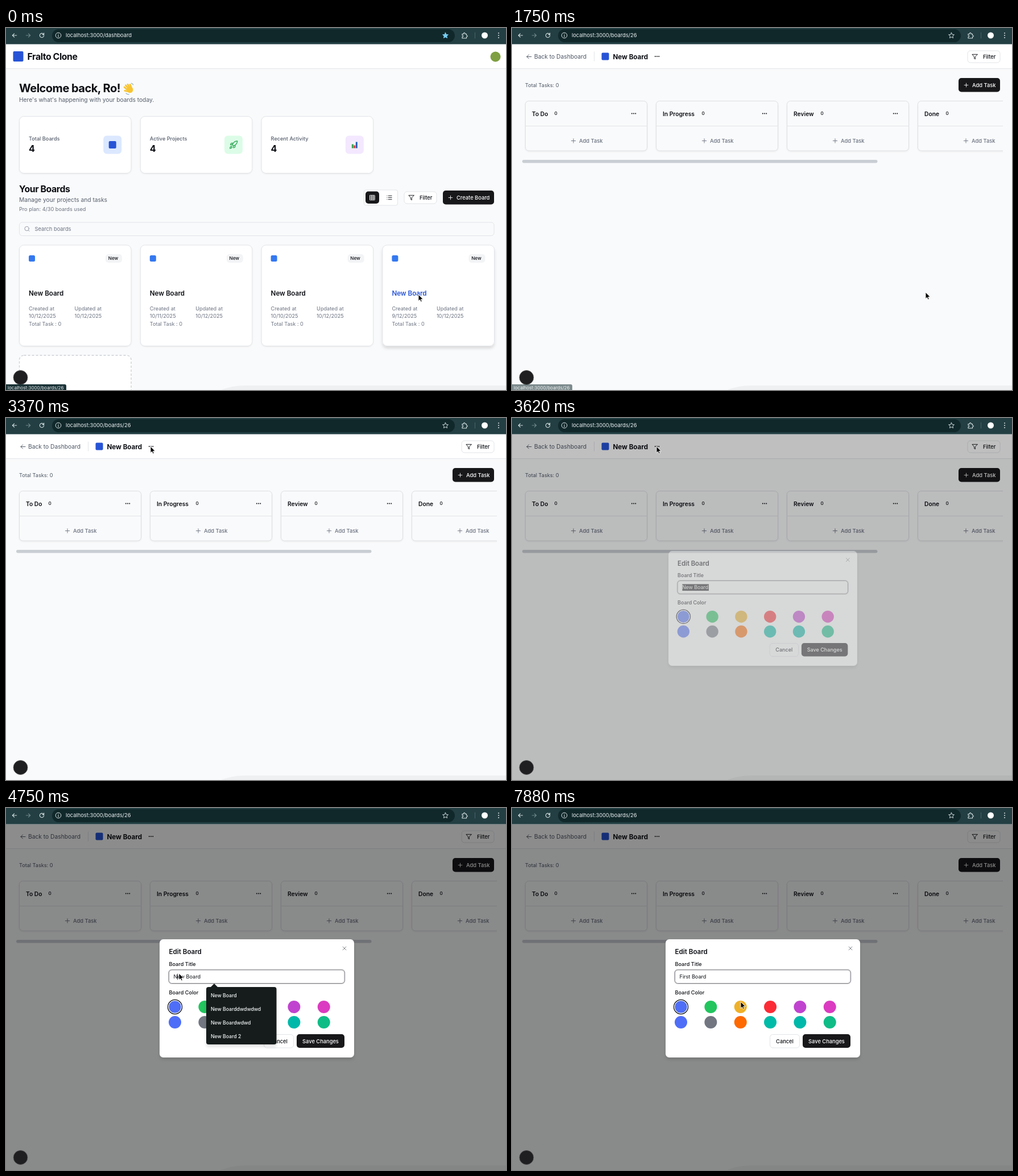
Animation, 879 px wide and 637 px high, one loop 8 s. Source, as an HTML page:

```html
<!DOCTYPE html>
<html lang="en">
<head>
<meta charset="utf-8">
<title>Board dashboard</title>
<style>
html, body { margin: 0; width: 100%; height: 100%; overflow: hidden; background: #f9fafb; }
svg { display: block; width: 879px; height: 637px; font-family: Inter, sans-serif; }
text { white-space: pre; }
</style>
</head>
<body>
<svg id="stage" viewBox="0 0 879 637"></svg>
<script>
const INK = '#0d0f14', GRAY = '#6b7280', LINE = '#e2e4e8', BLUE = '#2754d6';
const SMALL = 9.15, BODY = 10.25, LARGE = 11.6;
const LOOP = 8000, TICK = 125;
const COLUMNS = [23.5, 236.3, 449.1, 661.9];

// Drawing helpers: text is placed by its vertical centre.
const text = (x, y, str, size = SMALL, weight = 400, fill = INK, extra = '') =>
  `<text x="${x}" y="${y + size * .36}" font-size="${size}" font-weight="${weight}" fill="${fill}" ${extra}>${str}</text>`;
const rect = (x, y, w, h, r = 0, fill = '#fff', extra = '') =>
  `<rect x="${x}" y="${y}" width="${w}" height="${h}" rx="${r}" fill="${fill}" ${extra}/>`;
const box = (x, y, w, h, r, fill = '#fff', stroke = LINE, extra = '') =>
  rect(x, y, w, h, r, fill, `stroke="${stroke}" ${extra}`);
const circle = (x, y, r, fill, extra = '') => `<circle cx="${x}" cy="${y}" r="${r}" fill="${fill}" ${extra}/>`;
const path = (d, stroke, width = 1, fill = 'none') =>
  `<path d="${d}" stroke="${stroke}" stroke-width="${width}" fill="${fill}" stroke-linecap="round" stroke-linejoin="round"/>`;
const group = (content, attrs) => `<g ${attrs}>${content}</g>`;
// Icons live on a 24-unit grid, centred on (x, y).
const icon = (x, y, size, d, color, width = 2, fill = 'none') =>
  group(path(d, color, width, fill), `transform="translate(${x - size / 2} ${y - size / 2}) scale(${size / 24})"`);
const dots = (x, y, color, dx = 3.2, dy = 0) =>
  [-1, 0, 1].map(i => circle(x + i * dx, y + i * dy, 1, color)).join('');
const logo = (x, y, size) => rect(x - size / 2, y - size / 2, size, size, 2, BLUE);

const ICONS = {
  back: 'M20 12H4M11 5l-7 7 7 7',
  forward: 'M4 12h16M13 5l7 7-7 7',
  reload: 'M20 12a8 8 0 1 1-2.5-5.8L20 9M20 3v6h-6',
  star: 'M12 2l3 6.7 7.2.8-5.4 4.9 1.5 7.2L12 18l-6.3 3.6 1.5-7.2L1.8 9.5 9 8.7z',
  puzzle: 'M4 7h5V5a2 2 0 0 1 5 0v2h5v5h1a2 2 0 0 1 0 5h-1v5H4v-5h1a2 2 0 0 0 0-5H4z',
  filter: 'M22 3H2l8 9.5V19l4 2v-8.5z',
  plus: 'M12 4v16M4 12h16',
  close: 'M5 5l14 14M19 5L5 19',
  search: 'M21 21l-4.3-4.3M19 11a8 8 0 1 1-16 0 8 8 0 0 1 16 0z',
  grid: 'M3 3h18v18H3zM3 9h18M3 15h18M9 3v18M15 3v18',
  list: 'M8 5h13M8 12h13M8 19h13M3 5h.1M3 12h.1M3 19h.1',
  rocket: 'M4.5 16.5c-1.5 1.26-2 5-2 5s3.74-.5 5-2c.71-.84.7-2.13-.09-2.91a2.18 2.18 0 0 0-2.91-.09z' +
    'M12 15l-3-3a22 22 0 0 1 2-3.95A12.88 12.88 0 0 1 22 2c0 2.72-.78 7.5-6 11a22.35 22.35 0 0 1-4 2z' +
    'M9 12H4s.55-3.03 2-4c1.62-1.08 5 0 5 0M12 15v5s3.03-.55 4-2c1.08-1.62 0-5 0-5'
};

function browserBar(route, starred) {
  const pale = '#d5e0e1';
  return rect(0, 0, 879, 28.5, 0, '#233f43') + rect(81, 2, 708, 23, 11.5, '#11282b') +
    icon(15, 13, 11, ICONS.back, pale, 2.4) + icon(39, 13, 11, ICONS.forward, '#71878a', 2.4) +
    icon(63, 13, 11, ICONS.reload, pale, 2.4) +
    circle(92, 13, 4.8, 'none', `stroke="${pale}"`) + path('M92 12.5v3M92 10.6v.1', pale, 1.1) +
    text(105, 13, 'localhost:3000/' + route, 9.3, 400, '#eef3f3') +
    icon(772.5, 13, 11.5, ICONS.star, starred ? '#79cdf0' : pale, 2, starred ? '#79cdf0' : 'none') +
    icon(806, 13, 12, ICONS.puzzle, pale, 2.2) + path('M824.5 8v10', '#49646a', 1) +
    circle(841.5, 13, 5.5, '#fff') + dots(866, 13, pale, 0, 4);
}

const pageBase = () => rect(0, 28, 879, 609, 0, '#f9fafb') +
  rect(0, 28.5, 879, 42.5, 0, '#fff') + path('M0 71.5H879', LINE);

const filterButton = (x, y, w) => box(x, y - 10.5, w, 21, 5) +
  icon(x + 12.5, y, 11, ICONS.filter, INK, 2) + text(x + 27, y, 'Filter', 9.3, 500);

const darkButton = (x, y, w, label) => rect(x, y - 12.5, w, 24.5, 5, '#18181b') +
  icon(x + 13.5, y, 10, ICONS.plus, '#fff', 2) + text(x + 24, y, label, 9.3, 500, '#fff');

function wavingHand() {
  const skin = '#f8c433';
  return group(path('M-4 -1L-6 -6M-1 -3L-2.5 -8M2 -3L1.5 -8M5 -1L5 -6M-4 3L-8 0', skin, 2.8) +
    `<ellipse cx="1" cy="2" rx="5.5" ry="6" fill="${skin}"/>` +
    path('M-8 5Q-7 8 -4 9M8 -7Q10 -5 10 -3', '#7aa5bd', 1), 'transform="translate(216 107) rotate(-25)"');
}

function statCard(i, label, tint, picture) {
  const x = COLUMNS[i];
  return box(x, 155.5, 196.5, 100, 8, '#fff', LINE, 'filter="url(#soft)"') +
    text(x + 16.5, 195, label, SMALL, 500, '#565e6c') + text(x + 16.5, 212.5, '4', 16, 700) +
    rect(x + 147.7, 189.5, 32, 32, 6, tint) + picture(x + 163.7, 205.5);
}

function boardCard(x, created, hover) {
  const note = (dx, y, str) => text(x + dx, y, str, SMALL, 400, GRAY);
  const second = hover ? 95 : 97;
  return box(x, 382, 196.5, 177.5, 8, '#fff', LINE, `filter="url(#${hover ? 'lifted' : 'soft'})"`) +
    rect(x + 16.5, 400, 11, 11, 2.5, '#3478f0') +
    rect(x + 151.5, 398, 29, 15, 5, '#f3f4f6') +
    text(x + 165, 405.5, 'New', 8.1, 500, INK, 'text-anchor="middle"') +
    text(x + 16.5, 466.5, 'New Board', LARGE, 600, hover ? BLUE : INK) +
    note(16.5, 493.5, 'Created at') + note(16.5, 507, created) + note(16.5, 520.5, 'Total Task : 0') +
    note(second, 493.5, 'Updated at') + note(second, 507, '10/12/2025');
}

function dashboard() {
  const bars = (x, y) => rect(x - 6.5, y - 6, 13, 13, 1, '#f4f4fa') + rect(x - 5, y - 1, 3, 7, 0, '#35a44d') +
    rect(x - 1.5, y + 1, 3, 5, 0, '#d43d46') + rect(x + 2, y - 5, 3, 11, 0, '#245fb7');
  const created = ['10/12/2025', '10/11/2025', '10/10/2025', '9/12/2025'];
  return pageBase() + logo(21.5, 50, 18) + text(37.5, 50.5, 'Fralto Clone', 15.8, 700, INK, 'letter-spacing="-.4"') +
    circle(860.5, 50.5, 9, '#7f9f42') +
    text(23, 106, 'Welcome back, Ro!', 20, 700, INK, 'letter-spacing="-.5"') + wavingHand() +
    text(23, 126.5, "Here's what's happening with your boards today.", BODY, 400, '#565e6c') +
    statCard(0, 'Total Boards', '#dbe8fe', (x, y) => logo(x, y, 13)) +
    statCard(1, 'Active Projects', '#dcfce7', (x, y) => icon(x, y, 16, ICONS.rocket, '#27a44f')) +
    statCard(2, 'Recent Activity', '#f3e8ff', bars) +
    text(23, 283, 'Your Boards', 15.8, 700, INK, 'letter-spacing="-.4"') +
    text(23, 302, 'Manage your projects and tasks', BODY, 400, '#565e6c') +
    text(23, 319, 'Pro plan: 4/30 boards used', SMALL, 400, GRAY) +
    box(629.5, 285, 59, 27, 3) + rect(632, 287.5, 24, 21.5, 5, '#18181b') +
    icon(644, 298.5, 11, ICONS.grid, '#fff', 2) + icon(674, 298.5, 11, ICONS.list, INK, 2) +
    filterButton(700, 298.5, 57) + darkButton(768, 298.5, 90, 'Create Board') +
    box(23.5, 342, 834.5, 23.5, 5, '#f9fafb') + icon(37, 353.5, 11, ICONS.search, '#8b929e') +
    text(50.5, 354, 'Search boards', 9.3, 400, GRAY) +
    COLUMNS.map((x, i) => boardCard(x, created[i], i === 3)).join('') +
    box(23.5, 576, 196.5, 100, 8, '#fff', '#cbcfd5', 'stroke-width="1.3" stroke-dasharray="4 3"');
}

function listColumn(i, name, countX) {
  const x = 23.5 + i * 230;
  return box(x, 128.5, 214, 87.5, 6, '#f9fafb', '#dcdfe3', 'filter="url(#soft)"') +
    path(`M${x} 172.5h214`, LINE) + text(x + 11.5, 151, name, BODY, 600) +
    text(x + countX, 150.5, '0', 8.1, 500) + dots(x + 190.5, 150.5, INK) +
    icon(x + 84.5, 198.5, 11, ICONS.plus, GRAY) + text(x + 94.5, 198.5, 'Add Task', 9.3, 500, GRAY);
}

function boardPage(loaded) {
  const lists = [['To Do', 51], ['In Progress', 80], ['Review', 59], ['Done', 49]];
  const content = loaded
    ? group(lists.map(([name, countX], i) => listColumn(i, name, countX)).join(''), 'clip-path="url(#lists)"') +
      rect(18, 232, 624.5, 5.5, 2.75, '#c9ced4')
    : box(23.5, 128.5, 214, 27, 6, '#f9fafb', '#cbcfd5', 'stroke-dasharray="4 3"') +
      icon(93, 142, 10, ICONS.plus, GRAY) + text(103, 142, 'Add another list', SMALL, 500, GRAY);
  return pageBase() + icon(30, 50.5, 12, ICONS.back, '#4b5563', 1.9) +
    text(39, 50.5, 'Back to Dashboard', BODY, 400, '#4b5563') + path('M144.5 42v16', LINE) +
    logo(164, 50, 13) + text(177.5, 50.5, 'New Board', LARGE, 700) + dots(255, 50, INK) +
    filterButton(801, 50.5, 57) + text(23, 100.5, 'Total Tasks: 0', SMALL, 400, '#4b5563') +
    darkButton(785, 100.5, 73, 'Add Task') + content;
}

function suggestions() {
  const names = ['New Board', 'New Boarddwdwdwd', 'New Boardwdwd', 'New Board 2'];
  return group(rect(352, 315, 123.5, 101, 4, '#161d1d') + '<path d="M359 316l7-7 7 7z" fill="#161d1d"/>',
    'filter="url(#lifted)"') + names.map((name, i) => text(360, 329.5 + i * 24.2, name, 8.7, 500, '#f4f6f6')).join('');
}

function dialog(title, selected, caret) {
  const colors = ['#4f6ef7', '#22c55e', '#efb128', '#fb2c36', '#c043cf', '#db3bc0',
    '#4f6ef7', '#717680', '#fe6900', '#00bba7', '#00b8a9', '#10bc86'];
  const marked = `<tspan fill="${selected ? '#fff' : INK}">${selected}</tspan>${title.slice(selected.length)}`;
  return rect(270, 231, 342, 208, 6.5, '#fff', 'filter="url(#lifted)"') +
    text(286.5, 253, 'Edit Board', LARGE, 600) + icon(595, 247, 10, ICONS.close, '#60646b', 1.9) +
    text(286.5, 274.5, 'Board Title', SMALL, 500) +
    box(286.5, 285, 308.5, 23.5, 5, '#fff', '#c9c9cc', 'stroke-width="3"') +
    box(286.5, 285, 308.5, 23.5, 5, '#fff', '#8b8b8f') +
    (selected && rect(295, 291, selected.length > 3 ? 48 : 19, 12, 0, '#18181b')) +
    text(294.5, 297, marked) + (caret ? path('M301.5 292v10', INK, .8) : '') +
    text(286.5, 324.5, 'Board Color', SMALL, 500) +
    colors.map((c, i) => circle(297 + i % 6 * 52.35, i < 6 ? 350 : 377, 11, c)).join('') +
    circle(297, 350, 12.5, 'none', `stroke="${INK}" stroke-width="1.4"`) +
    circle(297, 350, 11.3, 'none', 'stroke="#fff" stroke-width="1"') +
    box(453.5, 398.5, 52, 23.5, 5) + text(479.5, 410.5, 'Cancel', 9.3, 500, INK, 'text-anchor="middle"') +
    rect(511, 398, 84, 24, 5, '#18181b') + text(553, 410.5, 'Save Changes', 9.3, 500, '#fff', 'text-anchor="middle"');
}

// Pointer stops as [tick, x, y], joined by straight moves.
const POINTER = [[0, 725, 469], [1, 727, 465], [16, 727, 465], [18, 400, 190], [19, 306, 98], [21, 306, 98],
  [27, 254, 50], [29, 254, 50], [30, 242, 54], [35, 304, 288], [38, 304, 291], [60, 304, 291],
  [61, 328, 296], [63, 402, 341]];

function pointer(tick) {
  if (tick >= 52 && tick < 61) return ''; // hidden while typing
  const next = Math.max(1, POINTER.findIndex(stop => stop[0] >= tick));
  const [t0, x0, y0] = POINTER[next - 1], [t1, x1, y1] = POINTER[next];
  const k = (tick - t0) / (t1 - t0);
  return `<path transform="translate(${x0 + (x1 - x0) * k} ${y0 + (y1 - y0) * k})"
    d="M0 0V11.5L2.6 9 4.4 13 6.3 12.2 4.6 8.3H8.2Z" fill="#000" stroke="#fff" stroke-width=".9"/>`;
}

const DEFS = `<defs>
  <filter id="soft" x="-5%" y="-10%" width="110%" height="125%"><feDropShadow dx="0" dy="1" stdDeviation=".8" flood-opacity=".07"/></filter>
  <filter id="lifted" x="-10%" y="-10%" width="120%" height="125%"><feDropShadow dx="0" dy="4" stdDeviation="2.5" flood-opacity=".12"/></filter>
  <clipPath id="lists"><rect x="18" y="120" width="845" height="130"/></clipPath></defs>`;

function draw(tick) {
  const onBoard = tick >= 10;
  const opening = tick < 29 ? 0 : tick < 30 ? .5 : 1;
  const typed = 'First'.slice(0, [52, 54, 55, 57, 59].filter(t => tick >= t).length);
  const title = (typed || 'New') + ' Board';
  const selected = tick < 35 ? 'New Board' : tick >= 43 && tick < 52 ? 'New' : '';
  const status = tick < 13 ? 1 : Math.max(0, (16 - tick) / 3.6);
  const scale = .94 + .06 * opening;
  const modal = opening
    ? rect(0, 28.5, 879, 608.5, 0, '#000', `opacity="${opening < 1 ? .25 : .45}"`) +
      group(dialog(title, selected, tick >= 37 && tick < 43) + (tick >= 37 && tick < 52 ? suggestions() : ''),
        `opacity="${opening < 1 ? .42 : 1}" transform="translate(441 335) scale(${scale}) translate(-441 -335)"`)
    : '';
  return DEFS + (onBoard ? boardPage(tick >= 12) : dashboard()) + modal +
    '<path d="M378 637Q398 629 420 629H879V637Z" opacity=".04"/>' +
    browserBar(onBoard ? 'boards/26' : 'dashboard', !onBoard) +
    circle(25.5, 615, 12.5, '#1f1f21', 'stroke="#5d5d60" stroke-width=".8"') +
    group(rect(-4, 627, 110, 14, 3, '#1c3438') + text(3, 633, 'localhost:3000/boards/26', 8, 400, '#e8eeee'),
      `opacity="${status}"`) + pointer(tick);
}

const stage = document.getElementById('stage');
let shown = -1;
function frame() {
  const tick = Math.floor((performance.now() % LOOP + 5) / TICK) % (LOOP / TICK);
  if (tick !== shown) stage.innerHTML = draw(shown = tick);
  requestAnimationFrame(frame);
}
frame();
</script>
</body>
</html>
```
